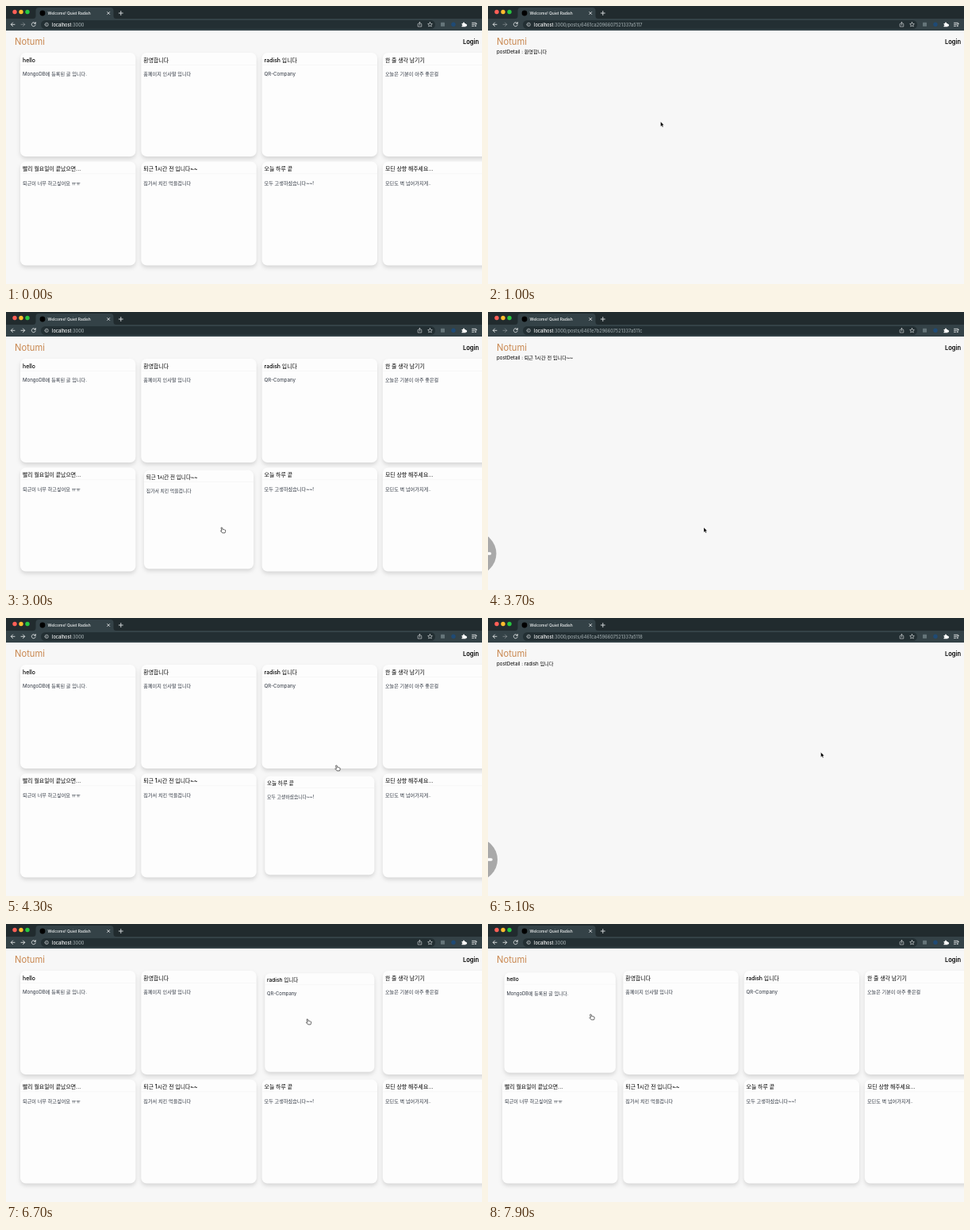
Recreate the animation shown at these times as an HTML page. Size 600 by 351 pixels, loop 8 s.

```html
<!DOCTYPE html>
<html lang="ko">
<head>
<meta charset="utf-8">
<style>
html, body { margin: 0; width: 100%; height: 100%; overflow: hidden; background: #f7f7f7; }
svg { display: block; width: 600px; height: 351px; font-family: Inter, "Noto Sans CJK KR", "Noto Sans CJK", sans-serif; }
text { white-space: pre; }
.card > rect:first-child { filter: drop-shadow(0 3px 2.6px rgba(0, 0, 0, .13)); }
.title { font-size: 6.9px; font-weight: 500; }
.body { font-size: 6.15px; fill: #2f3641; }
.icon { fill: none; stroke: #dfe3e4; stroke-width: .9; stroke-linecap: round; stroke-linejoin: round; }
.thin { stroke-width: .6; }
.dim { opacity: .4; }
</style>
</head>
<body>
<svg id="stage" viewBox="0 0 600 351"></svg>
<script>
const LOOP = 8000, STEP = 100, HOVER_MS = 140;
const CARD_W = 145.4, CARD_H = 131;

const cards = [
  ['hello', 'MongoDB에 등록된 글 입니다.'],
  ['환영합니다', '홈페이지 인사말 입니다'],
  ['radish 입니다', 'QR-Company'],
  ['한 줄 생각 남기기', '오늘은 기분이 아주 좋은걸'],
  ['빨리 월요일이 끝났으면...', '퇴근이 너무 하고싶어요 ㅠㅠ'],
  ['퇴근 1시간 전 입니다~~', '집가서 치킨 먹을겁니다'],
  ['오늘 하루 끝', '모두 고생하셨습니다~~!'],
  ['모딘 상향 해주세요...', '모딘도 벽 넘어가지게..'],
].map(([title, body], i) => ({ title, body, x: 18 + 152.3 * (i % 4), y: i < 4 ? 59 : 196.5 }));

// [start, opened card, post id]; without a card the list shows
const pages = [
  [0], [600, 1, '6461ca2096607521337a5117'],
  [1500], [3100, 5, '6461e7b296607521337a511c'],
  [3900], [4600, 2, '6461ca4596607521337a5118'],
  [5300], [5700, 6, '6461e7d496607521337a511e'],
  [6200],
];

// cursor tip: [time, x, y]
const path = [
  [100, 236, 262], [400, 222, 152], [900, 220, 152], [1000, 217.5, 146], [1300, 9, 24],
  [1600, 9, 24], [2300, 215, 165], [2800, 272, 272], [3800, 272, 272], [4200, 415, 203],
  [4300, 416.5, 186], [4500, 419.5, 169.5], [5200, 419.5, 169.5], [5600, 416.5, 216],
  [6200, 416.5, 216], [6700, 380, 120], [7100, 205, 45], [7200, 205, 45],
  [7700, 170, 54], [7800, 148, 85], [7900, 129.5, 114],
];
const swipes = [3640, 5020, 5940];

const snap = t => Math.floor(t / STEP) * STEP;
const pageAt = t => pages.findLast(p => p[0] <= t) || pages[0];

function cursorAt(t) {
  if (t < path[0][0]) return null;
  const i = path.findIndex(p => p[0] > t);
  if (i < 0) return path.at(-1).slice(1);
  const [a, b] = [path[i - 1], path[i]], k = (t - a[0]) / (b[0] - a[0]);
  return [a[1] + (b[1] - a[1]) * k, a[2] + (b[2] - a[2]) * k];
}

function hoveredAt(t) {
  const tip = cursorAt(t);
  if (!tip || pageAt(t)[1] !== undefined) return null;
  const [x, y] = tip;
  return cards.find(c => x >= c.x && x <= c.x + CARD_W && y >= c.y && y <= c.y + CARD_H);
}

// share of the last transition span spent over the card
function hoverAmount(card, t) {
  let hits = 0;
  for (let k = 1; k <= 10; k++) hits += hoveredAt(snap(t - k * HOVER_MS / 10)) === card;
  return hits / 10;
}

const text = (x, y, size, fill, content, extra = '') =>
  `<text x="${x}" y="${y}" font-size="${size}" fill="${fill}" ${extra}>${content}</text>`;
const rect = (x, y, w, h, fill, r = 0) =>
  `<rect x="${x}" y="${y}" width="${w}" height="${h}" rx="${r}" fill="${fill}"/>`;
const circle = (x, y, r, fill) => `<circle cx="${x}" cy="${y}" r="${r}" fill="${fill}"/>`;
const icon = (d, variant = '') => `<path class="icon ${variant}" d="${d}"/>`;

function browser(t) {
  const [, opened, id] = pageAt(t), tip = cursorAt(t);
  const overBack = tip && tip[0] < 16 && tip[1] > 17 && tip[1] < 30;
  const canForward = opened === undefined && t >= 1500;
  const url = `localhost<tspan fill="#9ba6a9">:3000${id ? '/posts/' + id : ''}</tspan>`;
  return rect(0, 0, 600, 31, '#212b2e') + rect(0, 16, 600, 15, '#344247') +
    '<path d="M34 16q3.5 0 3.5-3.5v-6.500q0-4 4-4h90q4 0 4 4v6.500q0 3.500 3.500 3.500z" fill="#344247"/>' +
    ['#ff5f57', '#febc2e', '#28c840'].map((c, i) => circle(11 + 8 * i, 7.5, 2.7, c)).join('') +
    circle(46, 9, 3.4, '#000') +
    text(52.5, 10.8, 4.9, '#f1f3f3', 'Welcome! Quiet Radish', 'font-weight="500"') +
    icon('M127.700 7.500l3 3m0-3l-3 3M142.300 9h5m-2.500-2.500v5') +
    (overBack ? circle(8.700, 23.300, 6, '#4c5a5e') : '') +
    icon('M11 23.300H6.300m2.200-2.300l-2.200 2.300l2.200 2.300') +
    icon('M19 23.300h4.700m-2.200-2.300l2.200 2.300l-2.200 2.300', canForward ? '' : 'dim') +
    icon('M37 22a2.500 2.500 0 1 0 .2 2M37.300 20.500v1.700h-1.700') +
    rect(44, 18, 497, 11, '#232f33', 5.5) +
    icon('M49 23.400a2.200 2.200 0 1 0 4.400 0a2.200 2.200 0 1 0-4.400 0M51.200 23.300v1.100M51.200 22.200v0', 'thin') +
    text(58, 25.5, 5.6, '#fff', url, 'font-weight="450"') +
    icon('M520 22.500h-.800v3.500h4.600v-3.500h-.800M521.500 24v-3.500m-1.200 1l1.200-1.200l1.200 1.200', 'thin') +
    icon('M534.500 20.500l.850 1.850l2 .250l-1.500 1.350l.400 2l-1.750-1l-1.750 1l.400-2l-1.500-1.350l2-.250z', 'thin') +
    rect(548, 20.800, 5, 5, '#65757a', .5) + circle(564, 23.300, 2.700, '#1f4a75') +
    '<path d="M574.500 22h1.500a1.100 1.100 0 1 1 2 0h1.500v1.300a1.100 1.100 0 1 1 0 2v1h-5v-1.300a.900.900 0 1 0 0-1.800z" fill="#fff"/>' +
    icon('M587.500 21.300h5M587.500 23.300h3M587.500 25.300h2M592 25.500v-3h1.300M592 25.300h-.800');
}

function cardView(card, t) {
  const { x, y, title, body } = card, scale = 1 - .05 * hoverAmount(card, t);
  const cx = x + CARD_W / 2, cy = y + CARD_H / 2;
  return `<g class="card" transform="translate(${cx} ${cy}) scale(${scale}) translate(${-cx} ${-cy})">` +
    rect(x, y, CARD_W, CARD_H, '#fdfdfd', 7) + rect(x, y + 15, CARD_W, .6, '#f3f3f3') +
    `<text class="title" x="${x + 3}" y="${y + 11.600}">${title}</text>` +
    `<text class="body" x="${x + 3}" y="${y + 29.300}">${body}</text></g>`;
}

function content(t) {
  const opened = pageAt(t)[1];
  return rect(0, 31, 600, 320, '#f7f7f7') +
    text(11, 49.4, 11.2, '#c9874f', 'Notumi') +
    text(596, 48.2, 7.5, '#000', 'Login', 'font-weight="600" text-anchor="end"') +
    (opened === undefined
      ? cards.map(c => cardView(c, t)).join('')
      : text(11, 59.8, 6.2, '#000', 'postDetail : ' + cards[opened].title));
}

// back-swipe bubble: slides in, then fades once the page has changed
function swipe(t) {
  const start = swipes.find(s => t >= s && t < s + 480);
  if (!start) return '';
  const age = t - start, x = 6 + .075 * Math.min(age, 250) - 27;
  const opacity = Math.min(1, (480 - age) / 220);
  return `<g transform="translate(${x} 305)" opacity="${opacity}">` + circle(0, 0, 27, '#a9a9a9') +
    '<path d="M19 0H-13m10-10l-10 10l10 10" fill="none" stroke="#fff" stroke-width="3.500" stroke-linecap="round"/></g>';
}

function cursor(t) {
  const tip = cursorAt(t);
  if (!tip) return '';
  const shape = hoveredAt(t)
    ? '<path d="M-.600.100q.800-.500 1.200.400l.500 2q1-.500 1.400.200q.900-.300 1.200.400q.900-.100 1 .900q.100 1.500-.700 2.900H.700L-1.500 4.400q.100-.800 1.500-.200L-.800 1.100q-.100-.700.200-1z" fill="#fff" stroke="#222" stroke-width=".7"/>'
    : '<path d="M0 0v6.200l1.400-1.300l1 2.200l1.100-.500l-1-2.100h1.900z" fill="#000" stroke="#fff" stroke-width=".4"/>';
  return `<g transform="translate(${tip})">${shape}</g>`;
}

const stage = document.getElementById('stage');
let shown = -1;
function frame() {
  const t = snap(performance.now() % LOOP);
  if (t !== shown) {
    stage.innerHTML = content(t) + browser(t) + swipe(t) + cursor(t);
    shown = t;
  }
  requestAnimationFrame(frame);
}
frame();
</script>
</body>
</html>
```
